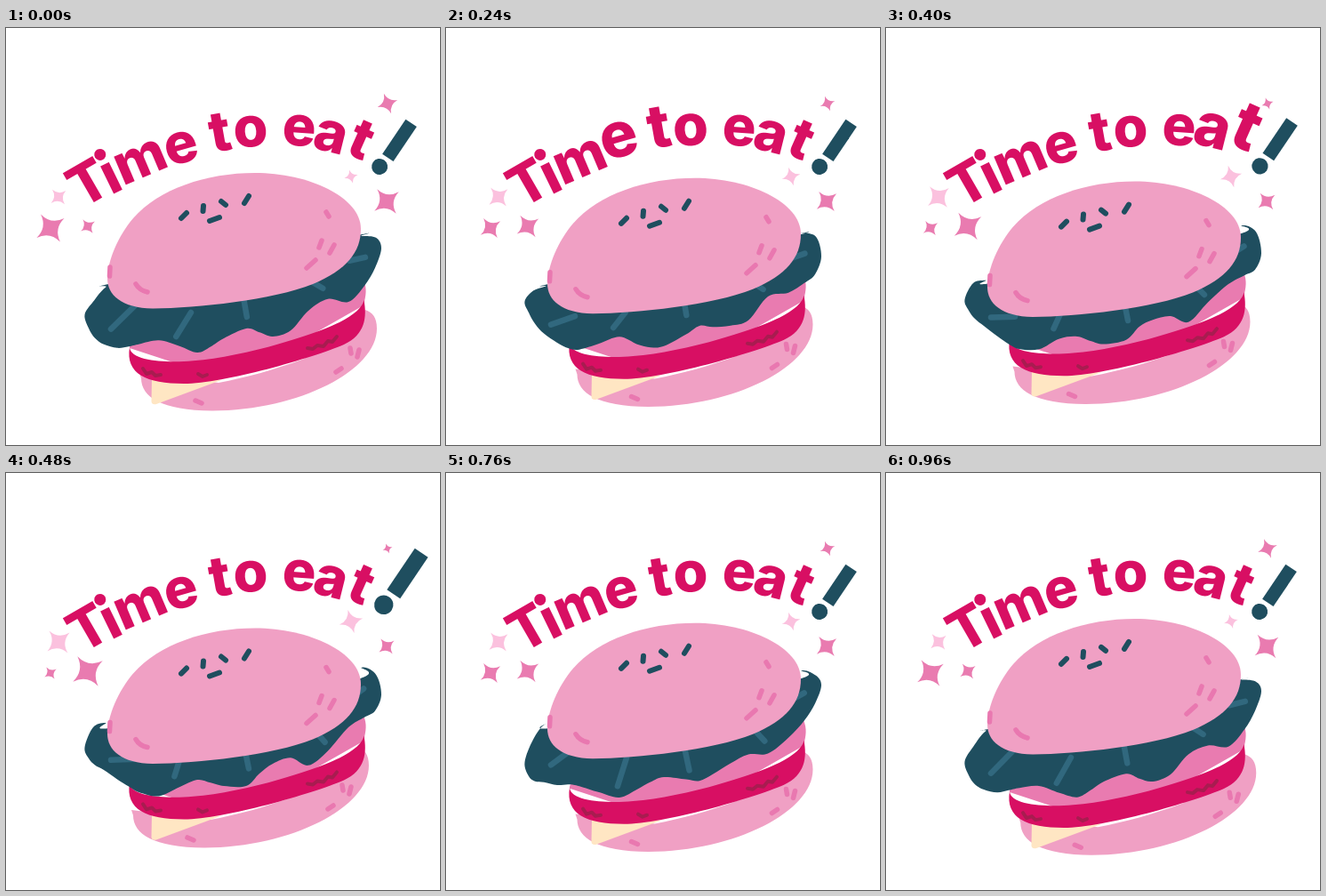
Animation of 488x469 px, one loop 1 s. Source, as an HTML page:

```html
<!DOCTYPE html>
<html lang="en">
<head>
<meta charset="utf-8">
<title>Time to eat!</title>
<style>
  html, body { margin: 0; width: 100%; height: 100%; overflow: hidden; background: #fff; }
  svg { display: block; width: 488px; height: 469px; }
  text { font: 800 63px Inter, "Open Sans", sans-serif; text-anchor: middle; }
  .line { fill: none; stroke-width: 5.5; stroke-linecap: round; stroke-linejoin: round; }
  .bun { fill: #f0a0c4; }
  .rose { fill: #e97bb0; }
  .pale { fill: #fbc1de; }
  .red { fill: #d80f63; }
  .teal { fill: #1f4e5f; }
  .roseLine { stroke: #e978b0; }
</style>
</head>
<body>
<svg viewBox="0 0 488 469">
  <g id="base">
    <path class="bun" d="M152 394C152 415 175 430 232 430.5C330 430 417 385 417 338C417 325 412 320 404 317L335 372C300 385 270 393 239 399L150 388Z"/>
    <path class="line roseLine" d="M213 419l7 3M371 387l6-4M387 360l1 6M397 362l-2 8"/>
  </g>
  <g id="filling">
    <path fill="#ffe6c3" d="M164 394L163.500 420Q164 424 169 423L242 396Z"/>
    <path class="rose" d="M139 360C140 340 200 330 300 320L380 290L402 283C406 293 405 300 402 312L300 370L200 380Z"/>
    <path class="red" d="M139 359C140 374 175 376 200 375C255 373 340 348 375 331C392 322 401 314 402.500 306C406 325 404 345 380 356C345 371 245 400 200 400C158 400 134 389 139 359Z"/>
    <path class="line" style="stroke:#a81c50;stroke-width:4" d="M154 383l4 6 6-2 4 4 6-1M216 389l5 3 5-2M339 360l6 1 5-4 7 1 5-6 5 1 5-6"/>
  </g>
  <path id="leaf" class="teal"/>
  <path id="veins" class="line" style="stroke:#31687e;stroke-width:6.5"/>
  <g id="top">
    <path class="bun" d="M114 282C114 262 126 234 143 214C172 181 225 163 280 163C340 163 399 190 399 226C399 252 383 272 345 288C300 306 215 315 165 315.500C130 315 114 300 114 282Z"/>
    <path class="line roseLine" d="M360 207l3 5M355 239l-3 8M369 244l-5 9M348 261l-10 9M117 269l-.5 10M146 288Q150 295 159 297"/>
    <path class="line" style="stroke:#1f4e5f;stroke-width:6" d="M197 214l6-6M222 200l-.5 6M242 195l5 4M268 197l5-8M229 217l11-4"/>
  </g>
  <g id="stars"></g>
  <g id="words"></g>
</svg>
<script>
const $ = id => document.getElementById(id);
const make = (tag, parent, attrs) => {
  const el = document.createElementNS("http://www.w3.org/2000/svg", tag);
  for (const key in attrs) el.setAttribute(key, attrs[key]);
  return parent.appendChild(el);
};
const wave = (t, peak) => Math.cos(2 * Math.PI * (t - peak));

// Leaf outline: x, mean y, swing, time of lowest position
const leaf = [
  [112, 286, 7, .1], [98, 297, 11, -.03], [88.5, 316, 11, .85], [93, 330, 13, .85],
  [100, 339, 12, .9], [110, 345, 11, .97], [125, 352, 8, .03], [138, 355, 6, .16],
  [150, 357, 5, .3], [172, 357.5, 6.5, .55], [195, 356, 9, .78], [215, 355, 10, 0],
  [230, 353, 8, .13], [245, 350, 8, .27], [270, 345, 7, .5], [285, 340.5, 6, .8],
  [300, 337, 10, .98], [320, 330, 11, .06], [340, 323, 8, .36], [362, 309, 8, .66],
  [385, 297, 11, 0], [403, 282, 9, .08], [415, 268, 9, .22], [422, 248, 9, .25],
  [416, 231, 6, .1], [400, 226, 9, .08], [385, 235, 0, 0], [130, 285, 0, 0]
];

// Smooth closed curve through the points
function closedCurve(pts) {
  const n = pts.length, at = i => pts[(i + n) % n];
  let d = "M" + pts[0];
  for (let i = 0; i < n; i++) {
    const [a, b, c, e] = [at(i - 1), at(i), at(i + 1), at(i + 2)];
    d += "C" + [0, 1].map(j => b[j] + (c[j] - a[j]) / 6) +
         " " + [0, 1].map(j => c[j] - (e[j] - b[j]) / 6) + " " + c;
  }
  return d + "Z";
}

function veinPath(t) {
  const y = (mean, swing, peak) => mean + swing * wave(t, peak);
  return [
    [145, y(316.5, 9, .33), 118, y(330.5, 8.5, .05)],
    [y(202, 6, .98), 320, y(190.5, 2.5, .8), y(344.5, 8, .8)],
    [267.5, 306, y(272, 2, .65), y(329, 7, .65)],
    [343, 285, y(357.5, 1.5, .6), y(298, 6.5, .6)],
    [386, y(258, 4, .06), y(403, 1, .06), y(250, 8.5, .06)]
  ].map(([a, b, c, d]) => `M${a} ${b}L${c} ${d}`).join("");
}

// x, y, tilt, radius, growth, colour
const stars = [
  [50, 225, 55, 19, -11.4, "rose"], [92, 223, 55, 9.6, 11.2, "rose"],
  [59, 190, 50, 10.8, 5.8, "pale"], [429, 85, 70, 12, -6.5, "rose"],
  [388, 167, 75, 7.8, 6, "pale"], [428, 195, 52, 17.4, -7, "rose"]
].map(([x, y, tilt, r, grow, cls]) => ({
  x, y, tilt, r, grow,
  el: make("path", $("stars"), {
    class: cls, d: "M1 0Q.14 .14 0 1Q-.14 .14-1 0Q-.14-.14 0-1Q.14-.14 1 0Z"
  })
}));

// glyph, x, y, tilt, time of hop in ms
const letters = [
  ["T", 92, 173.5, -30, 125], ["ı", 118.5, 168.5, -26, 145], ["m", 151.5, 150.5, -23, 165],
  ["e", 197, 134.5, -16, 205], ["t", 241, 121, -10, 290], ["o", 275, 116, -4, 305],
  ["e", 329.5, 115, 4, 325], ["a", 365, 122, 14, 355], ["t", 398, 129, 24, 400],
  ["!", 438, 133, 34, 470]
].map(([ch, x, y, tilt, peak]) => {
  const el = make("g", $("words"), { class: ch === "!" ? "teal" : "red" });
  if (ch === "!") {
    make("rect", el, { x: -7.5, y: -31.5, width: 15, height: 47 });
    make("circle", el, { cx: -2, cy: 29, r: 9 });
  } else {
    make("text", el, { y: ch === "T" ? 23 : 17.3 }).textContent = ch;
    if (ch === "ı") make("circle", el, { cy: -29, r: 6.5 });
  }
  return { el, x, y, tilt, peak };
});

function draw(now) {
  const ms = Math.floor(now % 1000 / 40) * 40, t = ms / 1000;
  const k = 1 - Math.abs(1 - 2 * t);
  const move = (id, x, y) => $(id).setAttribute("transform", `translate(${x * k} ${y * k})`);
  move("top", 0, 12);
  move("filling", 0, -11);
  move("base", -9.4, -9.4);

  $("leaf").setAttribute("d", closedCurve(leaf.map(([x, y, swing, peak]) => [x, y + swing * wave(t, peak)])));
  $("veins").setAttribute("d", veinPath(t));

  for (const s of stars)
    s.el.setAttribute("transform", `translate(${s.x} ${s.y}) rotate(${s.tilt}) scale(${s.r + s.grow * k})`);

  for (const l of letters) {
    const off = Math.min(1, Math.abs(ms - l.peak) / 85);
    const hop = Math.cos(off * Math.PI / 2) ** 2;
    l.el.setAttribute("transform",
      `translate(${l.x} ${l.y}) rotate(${l.tilt}) translate(0 ${-15 * hop}) scale(${1 + .2 * hop})`);
  }
  requestAnimationFrame(draw);
}
draw(0);
</script>
</body>
</html>
```
